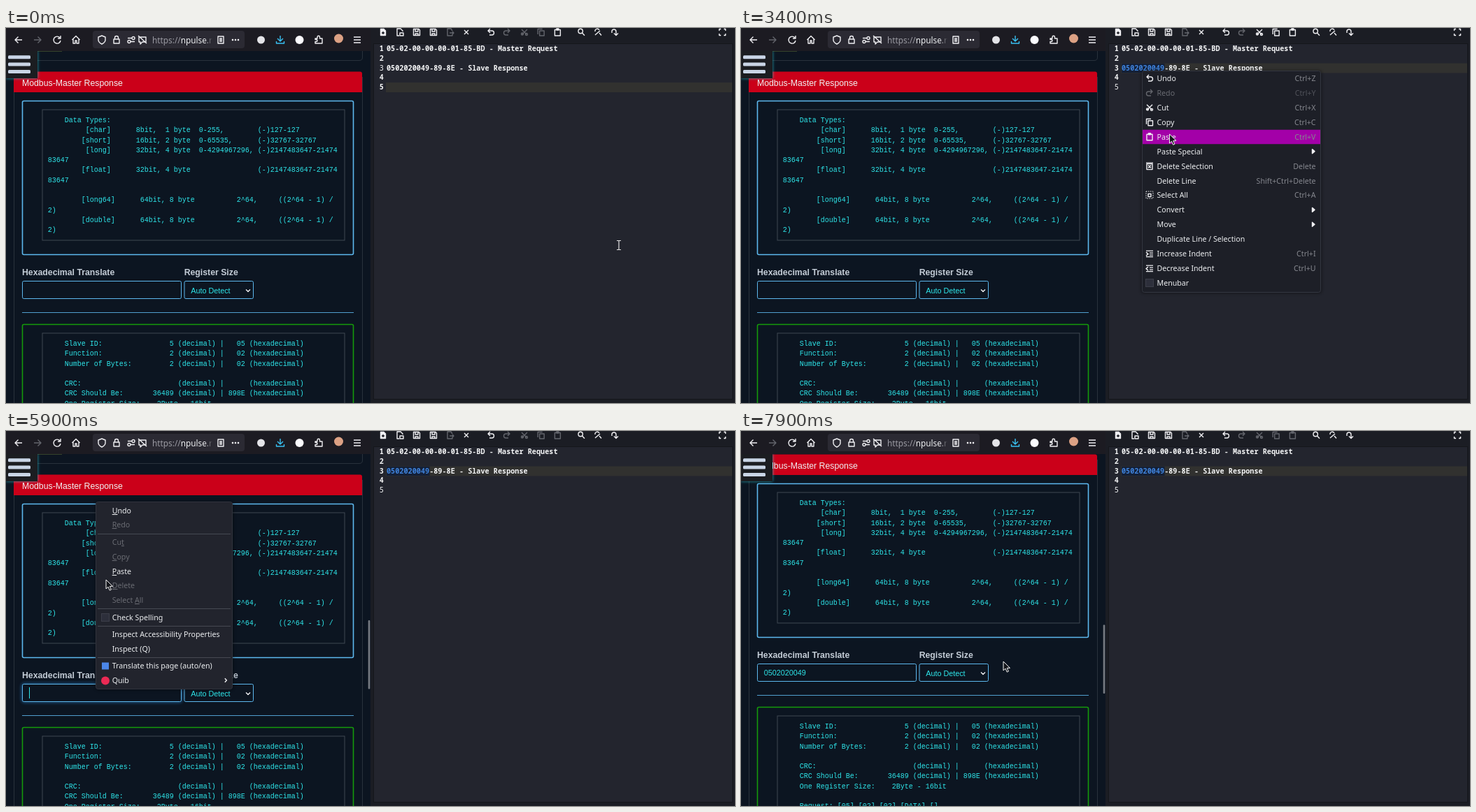
These frames come from a looping animation (1042 px wide and 537 px high, 8 s). An HTML page:

```html
<!DOCTYPE html>
<html lang="en">
<head>
<meta charset="utf-8">
<title>Register translator</title>
<style>
html, body { margin: 0; width: 100%; height: 100%; overflow: hidden; background: #181a21; }
svg { display: block; width: 100%; height: 100%; }
text { white-space: pre; }
.mono { font: 10px "Liberation Mono", monospace; fill: #2ee6ea; }
.sans { font: 12.28px "Liberation Sans", sans-serif; fill: #f0f0f2; }
.label { font-weight: bold; fill: #c3ccd6; }
.field { font-size: 10.8px; fill: #2ee6ea; }
.code { font: 600 10.2px "Noto Sans Mono", monospace; fill: #f4f5f6; }
.menu { font: 10.65px "Noto Sans", sans-serif; fill: #eceef0; }
.menu.dim { fill: #696b72; }
.menu.key { fill: #85878e; text-anchor: end; }
.icon { fill: none; stroke: #f0f0f3; stroke-width: 1.4; stroke-linejoin: round; }
.icon.dim { stroke: #63656c; }
.icon.solid { fill: #f0f0f3; }
.box { fill: none; stroke: #5db8ee; }
</style>
</head>
<body>
<svg id="stage" viewBox="0 0 1042 537"></svg>
<script>
const LOOP = 8000;
const stage = document.getElementById('stage');

const text = (x, y, s, cls, more = '') => `<text x="${x}" y="${y}" class="${cls}" ${more}>${s}</text>`;
const rect = (x, y, w, h, more) => `<rect x="${x}" y="${y}" width="${w}" height="${h}" ${more}/>`;
const circle = (x, y, r, fill) => `<circle cx="${x}" cy="${y}" r="${r}" fill="${fill}"/>`;
const icon = (name, x, y, cls = '', more = '') =>
  `<path class="icon ${cls}" transform="translate(${x} ${y})" d="${shapes[name]}" ${more}/>`;
const lines = (x, y, step, cls, rows) =>
  rows.map((s, i) => s && text(x, Math.round(y + i * step), s, cls)).join('');
// Places strings at character columns: at(4, 'a', 10, 'b')
const at = (...parts) => {
  let s = '';
  for (let i = 0; i < parts.length; i += 2) s = s.padEnd(parts[i]) + parts[i + 1];
  return s;
};

const shapes = {
  back: 'M5 0H-5M-.5-4.5L-5 0L-.5 4.5',
  forward: 'M-5 0H5M.5-4.5L5 0L.5 4.5',
  reload: 'M4-3A5 5 0 1 0 5 1M5-6V-2H1',
  home: 'M-5.5 0L0-5.5L5.5 0M-4-1V5H-1V1H1V5H4V-1',
  shield: 'M0-6L5-4V0C5 3 2 5 0 6C-2 5-5 3-5 0V-4Z',
  lock: 'M-4-1H4V5H-4ZM-2.5-1V-3A2.5 2.5 0 0 1 2.5-3V-1',
  sliders: 'M-5-2.5H1M-1 2.5H5M1-2.5a2 2 0 1 0 4 0a2 2 0 1 0-4 0M-5 2.5a2 2 0 1 0 4 0a2 2 0 1 0-4 0',
  muted: 'M-5-4H5V3H0L-3 6V3H-5ZM-6-6L6 5',
  reader: 'M-4-5H4V5H-4ZM-2-2H2M-2 0H2M-2 2H2',
  dots: 'M-4.5-.5h1v1h-1zM-.5-.5h1v1h-1zM3.5-.5h1v1h-1z',
  download: 'M0-6V2M-4-2L0 2L4-2M-5.5 2V5H5.5V2',
  puzzle: 'M-5-2H-2V-4A1.7 1.7 0 0 1 1.5-4V-2H5V5H-5V2.5H-3.5A1.5 1.5 0 0 0-3.5-.5H-5Z',
  bars: 'M-5-4H5M-5 0H5M-5 4H5',
  page: 'M-3.5-4.5H1L3.5-2V4.5H-3.5Z',
  plus: 'M-2 1H2M0-1V3',
  open: 'M4-1V-2L1-5H-4V5H-1M0 1H5V5H0Z',
  save: 'M-4.5-4.5H3L4.5-3V4.5H-4.5ZM-2-4V-1H2V-4M-2 4V2H2V4',
  export: 'M3-2L1-5H-4V5H3V3M-1 1H5M3-1L5 1L3 3',
  close: 'M-3-3L3 3M3-3L-3 3',
  undo: 'M-1-5L-4-2L-1 1M-4-2H1.5A3 3 0 0 1 1.5 4H-2',
  redo: 'M1-5L4-2L1 1M4-2H-1.5A3 3 0 0 0-1.5 4H2',
  cut: 'M-4-4L3 3M-4 4L4-4M-4.5 2.5a1.5 1.5 0 1 0 3 0a1.5 1.5 0 1 0-3 0M1.5 3a1.5 1.5 0 1 0 3 0a1.5 1.5 0 1 0-3 0',
  copy: 'M-2-2H4.5V5H-2ZM-4.5 3V-4.5H2',
  paste: 'M-4-3.5H4V5H-4ZM-1.5-5H1.5V-3H-1.5Z',
  search: 'M-4-1.5a3.2 3.2 0 1 0 6.4 0a3.2 3.2 0 1 0-6.4 0M1.5 1L5 4.8',
  replace: 'M-4-1a3.2 3.2 0 0 1 6-2M2 1L5 4.5M-4 4L3-2',
  jump: 'M-4 1V-1A3 3 0 0 1 2-1V4M-1 1.5L2 4.5L5 1.5',
  full: 'M-4.5-2V-4.5H-2M2-4.5H4.5V-2M4.5 2V4.5H2M-2 4.5H-4.5V2',
  trash: 'M-5-4.5H5M-4-3H4V5H-4ZM-2-1L2 3M2-1L-2 3',
  all: 'M-2-2H2V2H-2Z',
  indent: 'M-5-4H5M0-1H5M0 2H5M-5 4.5H5M-5-2L-2 .5L-5 3',
  outdent: 'M-5-4H5M0-1H5M0 2H5M-5 4.5H5M-2-2L-5 .5L-2 3',
  arrow: 'M-1.5-3L2 0L-1.5 3Z',
  down: 'M-3-1.5L0 1.5L3-1.5',
  right: 'M-1.2-2.8L1.4 0L-1.2 2.8'
};

const dataTypes = [
  at(4, 'Data Types:'),
  at(9, '[char]', 21, '8bit,', 28, '1 byte', 36, '0-255,', 50, '(-)127-127'),
  at(8, '[short]', 21, '16bit, 2 byte', 36, '0-65535,', 50, '(-)32767-32767'),
  at(9, '[long]', 21, '32bit, 4 byte', 36, '0-4294967296,', 50, '(-)2147483647-21474'),
  '83647',
  at(8, '[float]', 21, '32bit, 4 byte', 50, '(-)2147483647-21474'),
  '83647', '',
  at(8, '[long64]', 22, '64bit, 8 byte', 45, '2^64,', 55, '((2^64 - 1) /'), '2)',
  at(8, '[double]', 22, '64bit, 8 byte', 45, '2^64,', 55, '((2^64 - 1) /'), '2)'
];
const decoded = (name, dec, hex) =>
  at(4, name, 30 - dec.length, dec, 31, '(decimal) |', 47 - hex.length, hex, 48, '(hexadecimal)');
const result = [
  decoded('Slave ID:', '5', '05'),
  decoded('Function:', '2', '02'),
  decoded('Number of Bytes:', '2', '02'), '',
  decoded('CRC:', '', ''),
  decoded('CRC Should Be:', '36489', '898E'),
  at(4, 'One Register Size:', 26, '2Byte - 16bit'), '',
  at(4, 'Request: [05] [02] [02] [DATA] []')
];

const page = `
  <g clip-path="url(#view)"><g id="page">
    <path d="M11.5 0V42Q11.5 46.5 16 46.5H505Q509.5 46.5 509.5 42V0M11.5 70V600M509.5 70V600" fill="none" stroke="#29323c"/>
    ${rect(45, 32.5, 35, 1, 'fill="#5f7034"')}
    <path d="M11 92V65.5Q11 62.5 14 62.5H506Q509 62.5 509 65.5V92Z" fill="#cb0019"/>
    ${text(23, 83, 'Modbus-Master Response', 'sans')}
    ${rect(23.5, 104.5, 473, 220, 'class="box" stroke-width="1.6" rx="2"')}
    ${rect(52, 117, 432, 187, 'fill="none" stroke="#3f4853"')}
    ${lines(59.7, 135, 14.2857, 'mono', dataTypes)}
    ${text(23, 354, 'Hexadecimal Translate', 'sans label')}
    ${text(254.7, 354, 'Register Size', 'sans label')}
    ${rect(23.5, 362.5, 227, 25, 'id="glow" fill="none" stroke="#2878bd" stroke-width="3" rx="3" filter="url(#blur)"')}
    ${rect(23.5, 362.5, 227, 25, 'class="box" rx="2" style="fill:#0c1521"')}
    ${text(32.7, 379, '0502020049', 'sans field', 'id="pasted"')}
    ${rect(33, 367, 1, 16, 'id="fieldCaret" fill="#2ee6ea"')}
    ${rect(255, 362.5, 98.5, 25, 'class="box" rx="2"')}
    ${text(264.2, 380, 'Auto Detect', 'sans field')}
    ${icon('down', 346, 376)}
    ${rect(23, 407, 474, 1, 'fill="#5db8ee" opacity=".85"')}
    <g id="suggest">${rect(24, 389, 226, 20.5, 'fill="#2a2a32" rx="2"')}
      ${text(28.5, 403, '0502020049', 'menu', 'style="font-size:11.5px"')}</g>
    ${rect(23.5, 424.5, 473, 260, 'fill="none" stroke="#149a0a" stroke-width="1.6" rx="2"')}
    ${rect(52, 437, 432, 220, 'fill="none" stroke="#3f4853"')}
    ${lines(59.7, 455, 14.2857, 'mono', result)}
  </g>
  ${rect(0, 33, 45, 39, 'fill="#2fd3df" opacity=".75" filter="url(#blur)"')}
  ${rect(0, 33, 45, 39, 'fill="#1b1d21"')}
  ${[0, 1, 2].map(i => rect(3, 39.3 + i * 10.3, 32, 5, 'rx="1.5" fill="#c9d5e6"')).join('')}</g>
  ${rect(517.7, 0, 2.6, 98.5, 'id="bar" rx="1" fill="#777b82"')}`;

const browserBar = `
  ${rect(0, 0, 521, 33, 'fill="#1c1b22"')}
  ${rect(124, 4, 217, 25, 'rx="4" fill="#2b2a33"')}
  ${[['back', 18], ['reload', 73], ['home', 100], ['shield', 137], ['lock', 158], ['sliders', 179],
     ['muted', 195], ['reader', 307], ['dots', 328], ['puzzle', 447], ['bars', 502]]
    .map(([n, x]) => icon(n, x, 17)).join('')}
  ${icon('forward', 45, 17, 'dim')}
  ${icon('download', 392, 17, '', 'style="stroke:#39c1f3"')}
  ${circle(364.5, 17, 5.5, '#e4e4e8')}${circle(419.5, 17, 6, '#fbfbfe')}${circle(475.5, 15, 6.5, '#dca184')}
  ${text(209, 21.5, '<tspan fill="#9a9aa2">https://</tspan>npulse.n', 'menu', 'style="font-size:11.8px"')}
  ${rect(284, 6, 11, 21, 'fill="url(#fade)"')}${rect(295, 6, 6, 21, 'fill="#2b2a33"')}`;

const tools = [['page', 539, 'solid'], ['open', 563], ['save', 587], ['save', 611], ['export', 635, 'dim'],
  ['close', 658], ['undo', 693], ['redo', 716, 'dim'], ['search', 822], ['replace', 846], ['jump', 870], ['full', 1024]];
const editor = `
  ${rect(521, 0, 521, 537, 'fill="#1b1d24"')}
  ${rect(525.5, 22.5, 513, 509, 'fill="#23252e" stroke="#14161b"')}
  ${rect(543, 78, 495, 14, 'id="row" fill="#31312f"')}
  ${rect(544, 51, 61.5, 13, 'id="selection" fill="#142037"')}
  ${tools.map(([n, x, c]) => icon(n, x, 6, c)).join('')}
  ${icon('plus', 539, 6, '', 'style="stroke:#1b1d24"')}
  ${['cut', 'copy', 'paste'].map((n, i) => icon(n, 741 + 23.7 * i, 6, '', `id="${n}"`)).join('')}
  ${[1, 2, 3, 4, 5].map(n => text(533.8, Math.round(19.2 + n * 13.8), n, 'code', `id="line${n}"`)).join('')}
  ${text(544, 33, '05-02-00-00-00-01-85-BD - Master Request', 'code')}
  ${text(544, 61, '<tspan id="word">0502020049</tspan>-89-8E - Slave Response', 'code')}
  ${rect(544, 78, 1.2, 14, 'id="caret" fill="#f4f4f4"')}`;

const editItems = [['Undo', 'Ctrl+Z', 'undo'], ['Redo', 'Ctrl+Y', 'redo', 'dim'], ['Cut', 'Ctrl+X', 'cut'],
  ['Copy', 'Ctrl+C', 'copy'], ['Paste', 'Ctrl+V', 'paste'], ['Paste Special', '>'], ['Delete Selection', 'Delete', 'trash'],
  ['Delete Line', 'Shift+Ctrl+Delete'], ['Select All', 'Ctrl+A', 'all'], ['Convert', '>'], ['Move', '>'],
  ['Duplicate Line / Selection', ''], ['Increase Indent', 'Ctrl+I', 'indent'], ['Decrease Indent', 'Ctrl+U', 'outdent'], ['Menubar', '']];
const ROW = 20.93;
const editMenu = `<g id="editMenu">
  ${rect(572, 61, 258, 319, 'fill="#000" opacity=".4" rx="4" filter="url(#blur)"')}
  ${rect(573.5, 61.5, 255, 317, 'fill="#1d1f27" stroke="#343741" rx="3"')}
  ${rect(574, 62, 254, 20.5, 'id="editHover" fill="#a300a8"')}
  ${editItems.map(([label, key, glyph, dim = ''], i) => {
    const y = 72 + i * ROW;
    return text(594.5, Math.round(y + 4), label, 'menu ' + dim)
      + (key === '>' ? icon('arrow', 818, y, 'solid', 'stroke-width="0"')
        : text(821.5, Math.round(y + 4), key, 'menu key', dim && 'style="fill:#50525a"'))
      + (glyph ? icon(glyph, 584, y, dim) : '');
  }).join('')}
  <rect x="579" y="234" width="10" height="10" fill="none" stroke="#eceef0" stroke-dasharray="1.5 1.5"/>
  ${rect(578.5, 359.5, 11, 11, 'fill="#2d2f3b" stroke="#3c3e49"')}</g>`;

const pageItems = [['_Undo', 114], ['_Redo', 134.5, 'dim'], ['Cu_t', 159.5, 'dim'], ['_Copy', 180, 'dim'], ['_Paste', 201],
  ['_Delete', 221.5, 'dim'], ['Select _All', 242.5, 'dim'], ['Check Spelling', 267], ['Inspect Accessibility Properties', 291.5],
  ['Inspect (Q)', 312], ['Translate this page (auto/en)', 336.5], ['Quib', 357]];
const pageMenu = `<g id="pageMenu">
  ${rect(128, 101, 197, 270, 'fill="#000" opacity=".4" rx="4" filter="url(#blur)"')}
  ${rect(128.5, 101.5, 195, 268, 'fill="#22242d" stroke="#30333d" rx="3"')}
  ${rect(129, 191, 194, 20.5, 'id="pageHover" fill="#a300a8"')}
  ${[147, 254, 279, 324].map(y => rect(131, y, 190, 1, 'fill="#464952"')).join('')}
  ${pageItems.map(([s, y, c = '']) => text(151.7, Math.round(y + 3.7),
    s.replace(/_(.)/, '<tspan text-decoration="underline">$1</tspan>'), 'menu ' + c)).join('')}
  ${rect(136.5, 261.5, 11, 11, 'fill="#2d2f3b" stroke="#3c3e49"')}
  ${rect(137, 331.5, 10, 10, 'fill="#4b86e8"')}${circle(142, 357.5, 6, '#ea2a54')}
  ${icon('right', 314, 357)}</g>`;

stage.innerHTML = `
  <defs>
    <clipPath id="view">${rect(0, 33, 521, 504, '')}</clipPath>
    <filter id="blur" x="-30%" y="-60%" width="160%" height="220%"><feGaussianBlur stdDeviation="2"/></filter>
    <linearGradient id="fade"><stop stop-color="#2b2a33" stop-opacity="0"/><stop offset="1" stop-color="#2b2a33"/></linearGradient>
  </defs>
  ${rect(0, 0, 521, 537, 'fill="#0c1521"')}
  ${page}${browserBar}${editor}${editMenu}${pageMenu}
  <path id="beam" d="M-3-6.5H3M-3 6.5H3M0-6.5V6.5" fill="none" stroke="#e2e2e2" stroke-width="1.2"/>
  <path id="pointer" d="M0 0V13L3 10.2L5.2 15.2L7.4 14.2L5.3 9.4H9.5Z" fill="#14161b" stroke="#f4f4f4"/>`;

const el = {};
stage.querySelectorAll('[id]').forEach(node => el[node.id] = node);
const show = (id, on) => el[id].style.display = on ? '' : 'none';

// time, x, y
const path = [[700, 876, 311], [1600, 574, 65], [1700, 583, 60], [1800, 573, 60], [2500, 573, 60], [2800, 594, 73],
  [3300, 612, 158], [3600, 614, 135], [4300, 370, 358], [4500, 146, 366], [4600, 138, 348], [4700, 128, 366], [5300, 128, 366],
  [5900, 143, 213], [6200, 160, 202], [6500, 160, 202], [7100, 410, 353], [7300, 410, 353], [7700, 375, 330]];

function pointAt(t) {
  const next = path.findIndex(k => k[0] > t);
  if (next < 0) return path.at(-1).slice(1);
  if (next === 0) return path[0].slice(1);
  const [a, b] = [path[next - 1], path[next]];
  const u = (t - a[0]) / (b[0] - a[0]);
  const e = u * u * (3 - 2 * u);
  return [a[1] + (b[1] - a[1]) * e, a[2] + (b[2] - a[2]) * e];
}

const within = (t, from, to) => t >= from && t < to;
const blink = t => t % 1000 < 500;

function draw(now) {
  const t = Math.floor(now % LOOP / 100) * 100;
  const [x, y] = pointAt(t);

  const editOpen = within(t, 2600, 3700);
  const row = Math.floor((y - 61.5) / ROW);
  show('editMenu', editOpen);
  show('editHover', x > 576 && row !== 1);
  el.editHover.setAttribute('y', 62 + row * ROW);

  const pageOpen = within(t, 5200, 6500);
  show('pageMenu', pageOpen);
  show('pageHover', within(y, 191, 211));

  const moved = t >= 2000, selected = t >= 2200;
  el.row.setAttribute('y', moved ? 50.5 : 78);
  el.line3.style.fontWeight = moved ? 800 : 500;
  el.line5.style.fontWeight = moved ? 500 : 800;
  show('selection', selected);
  el.word.style.fill = selected ? '#3f83dc' : '';
  show('caret', within(t, 300, 800) || within(t, 1300, 2200));
  el.caret.setAttribute('x', moved ? 575 : 544);
  el.caret.setAttribute('y', moved ? 50.5 : 78);
  const canCopy = within(t, 2200, 4900);
  el.cut.classList.toggle('dim', !canCopy);
  el.copy.classList.toggle('dim', !canCopy);
  el.paste.classList.toggle('dim', t >= 4900);

  const pasted = t >= 6600, focused = within(t, 4900, 7600);
  el.glow.style.opacity = focused ? Math.min(1, (t - 4800) / 300) * 0.7 : 0;
  show('pasted', pasted);
  show('fieldCaret', focused && blink(t - (pasted ? 6600 : 4900)));
  el.fieldCaret.setAttribute('x', pasted ? 93.5 : 33);
  show('suggest', pasted && focused);

  const scroll = t < 7700 ? 0 : 29 * ((t - 7600) / 300) ** 2;
  el.page.setAttribute('transform', `translate(0 ${-Math.round(scroll)})`);
  show('bar', within(t, 4000, 5200) || t >= 5500);
  el.bar.setAttribute('y', 271 + scroll * 0.22);

  const inField = within(x, 23, 251) && within(y, 362, 388);
  const beam = !editOpen && !pageOpen && (x > 543 || inField);
  show('beam', beam);
  show('pointer', !beam);
  el[beam ? 'beam' : 'pointer'].setAttribute('transform', `translate(${x} ${y})`);
  requestAnimationFrame(tick);
}

const start = performance.now();
function tick() { draw(performance.now() - start); }
tick();
</script>
</body>
</html>
```
